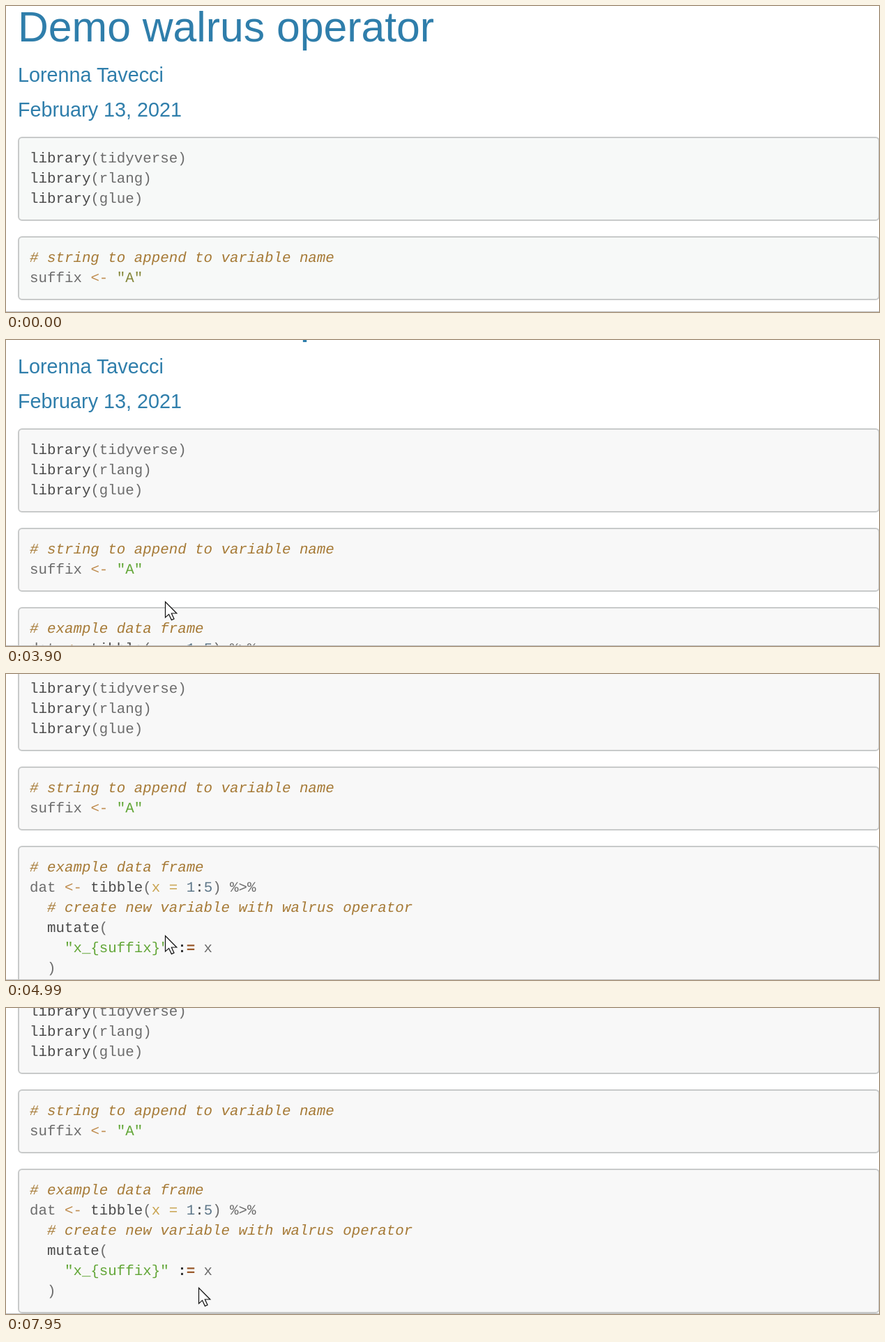
An HTML page that plays this animation: 1252x440 px, repeating every 8 s.

```html
<!DOCTYPE html>
<html lang="en">
<head>
<meta charset="utf-8">
<title>Demo walrus operator</title>
<style>
  html, body { margin: 0; width: 100%; height: 100%; overflow: hidden; background: #fff; }
  svg { display: block; }
  text { white-space: pre; }
  .head { font-family: "Liberation Sans", Arial, sans-serif; fill: #2f7eab; }
  .code {
    font: 20.8px "Liberation Mono", "Courier New", monospace;
    text-rendering: geometricPrecision;
    fill: #6c6c6c;
  }
  .box { fill: #f8f8f8; stroke: #c8caca; stroke-width: 2; }
  .fn { fill: #4a4a4a; }
  .com { fill: #a67a36; font-style: italic; }
  .op { fill: #bf8c4e; }
  .str { fill: #62a637; }
  .arg { fill: #c9a450; }
  .num { fill: #5d7688; }
  .colon { fill: #333; font-weight: bold; }
  .eq { fill: #99592a; font-weight: bold; }
  .top .box { fill: #f7f9f8; }
  .top .str { fill: #85873a; }
</style>
</head>
<body>
<svg width="1252" height="440" viewBox="0 0 1252 440">
  <defs><path id="bar" d="M-6 -12H-2L0 -10.5L2 -12H6M0 -10.5V10.5M-6 12H-2L0 10.5L2 12H6"/></defs>
  <g id="page"></g>
  <rect y="439" width="1252" height="1" fill="#bdbdbd"/>
  <g id="cursor">
    <path id="arrow" d="M.5 .5V23L5.6 18.4L9.4 26.6L13 25L9.3 17H16.8Z"
      fill="#fff" stroke="#111" stroke-width="1.2"/>
    <g id="beam" fill="none">
      <use href="#bar" stroke="#fff" stroke-width="4"/>
      <use href="#bar" stroke="#000" stroke-width="2"/>
    </g>
  </g>
</svg>
<script>
const LOOP = 8000, TICK = 77.7, LEADING = 29;
const $ = id => document.getElementById(id);
const page = $("page");

function add(parent, tag, attrs, content = "") {
  const el = document.createElementNS("http://www.w3.org/2000/svg", tag);
  for (const key in attrs) el.setAttribute(key, attrs[key]);
  el.textContent = content;
  return parent.appendChild(el);
}

function heading(content, y, size) {
  add(page, "text", { class: "head", x: 17, y, "font-size": size }, content);
}

// Draws lines of [class, text] pairs and returns the top of the next block.
function block(y, lines) {
  const height = 32 + LEADING * lines.length;
  add(page, "rect", { class: "box", x: 18, y, width: 1234, height, rx: 5 });
  lines.forEach((line, i) => {
    const row = add(page, "text", { class: "code", x: 34, y: y + 36 + i * LEADING });
    for (const [cls, content] of line) add(row, "tspan", { class: cls }, content);
  });
  return y + height + 24;
}

heading("Demo walrus operator", 51, 60.7);
heading("Lorenna Tavecci", 109, 28.75);
heading("February 13, 2021", 159, 28.75);

let top_ = 189;
const blocks = [
  ["tidyverse", "rlang", "glue"].map(name => [["fn", "library"], ["", `(${name})`]]),
  [
    [["com", "# string to append to variable name"]],
    [["", "suffix "], ["op", "<-"], ["str", ' "A"']]
  ],
  [
    [["com", "# example data frame"]],
    [["", "dat "], ["op", "<-"], ["fn", " tibble"], ["", "("], ["arg", "x ="],
     ["num", " 1"], ["fn", ":"], ["num", "5"], ["", ") %>%"]],
    [["com", "  # create new variable with walrus operator"]],
    [["fn", "  mutate"], ["", "("]],
    [["str", '    "x_{suffix}"'], ["", " "], ["colon", ":"], ["eq", "="], ["", " x"]],
    [["", "  )"]]
  ]
];
for (const lines of blocks) top_ = block(top_, lines);

const progress = (tick, from, to) => Math.min(1, Math.max(0, (tick - from) / (to - from)));
const smooth = u => u * u * (3 - 2 * u);

// A steady scroll that coasts to a stop.
function scrollAt(tick) {
  const coast = 1 - (1 - progress(tick, 55, 72)) ** 2.1;
  return Math.round(138 * progress(tick, 46, 55) + 76 * coast);
}

// The pointer glides from rest to rest; one glide circles the string.
const glides = [
  { from: 4, to: 6, x: 611, y: 185 },
  { from: 10, to: 18, x: 175, y: 387 },
  { from: 25, to: 26, x: 196, y: 392 },
  { from: 26, to: 38, x: 228, y: 376, rx: 35, ry: 32 },
  { from: 76, to: 87, x: 133, y: 401 },
  { from: 87, to: 94, x: 201, y: 400 },
  { from: 96, to: 102, x: 276, y: 402 }
];

function pointerAt(tick) {
  let x = 931, y = 425;
  for (const g of glides) {
    const u = progress(tick, g.from, g.to), turn = 2 * Math.PI * u;
    x += (g.x - x) * smooth(u) - (g.rx || 0) * (1 - Math.cos(turn));
    y += (g.y - y) * smooth(u) - (g.ry || 0) * Math.sin(turn);
    if (u < 1) break;
  }
  return [Math.round(x), Math.round(y)];
}

const show = (el, on) => el.setAttribute("visibility", on ? "visible" : "hidden");

function draw(ms) {
  const tick = Math.floor(ms / TICK);
  const scroll = scrollAt(tick);
  const [x, y] = pointerAt(tick);
  const onText = !scroll && x < 198 && y > 350 && y < 405;
  page.setAttribute("transform", `translate(0 ${-scroll})`);
  page.setAttribute("class", scroll ? "" : "top");
  $("cursor").setAttribute("transform", `translate(${x} ${y})`);
  show($("arrow"), tick >= 4 && !onText);
  show($("beam"), tick >= 4 && onText);
}

const start = performance.now();
function loop() {
  draw((performance.now() - start) % LOOP);
  requestAnimationFrame(loop);
}
loop();
</script>
</body>
</html>
```
